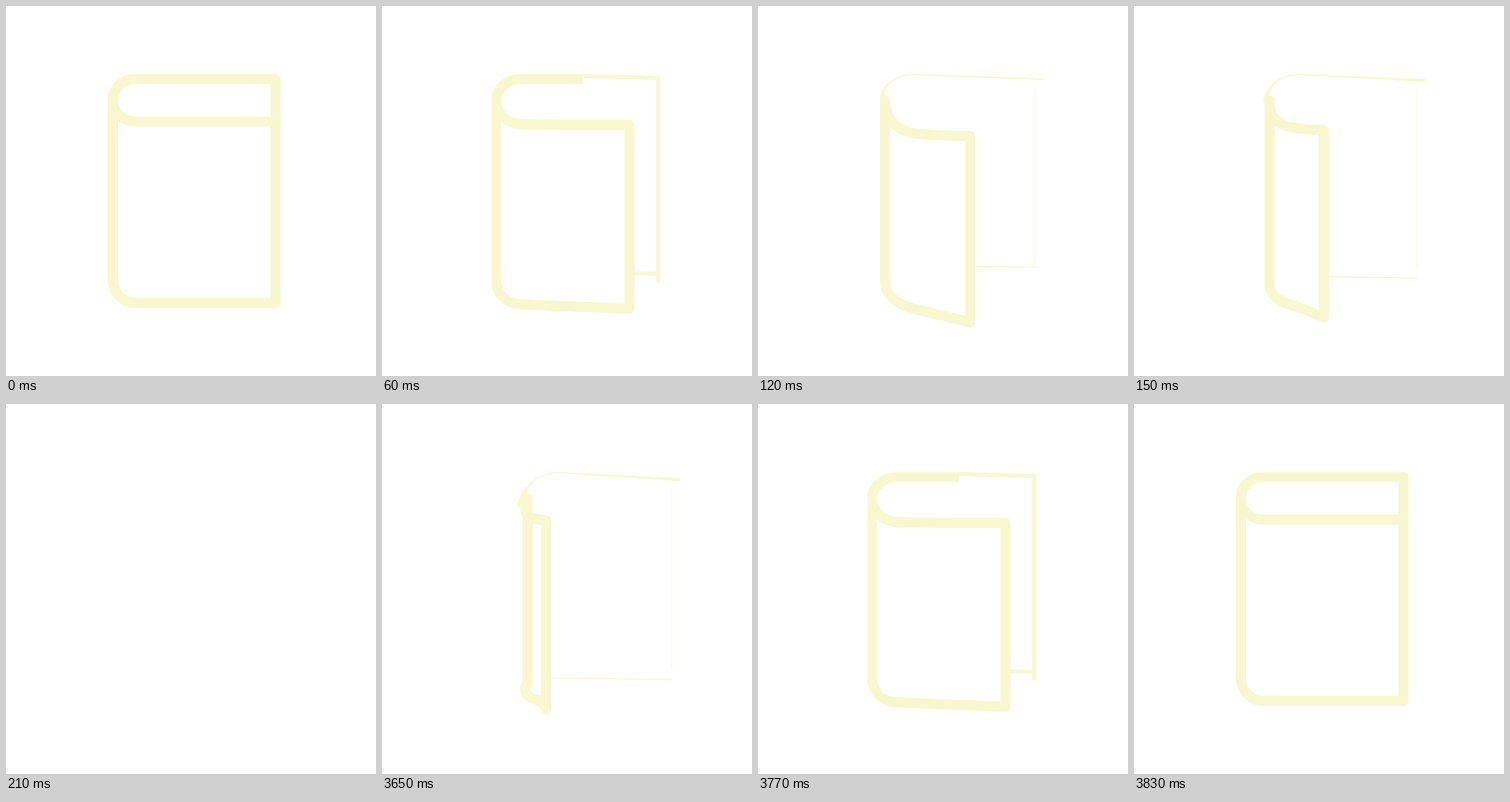
Recreate the animation shown at these times as an HTML page with a canvas. Size 400 by 400 pixels, loop 4860 ms.

```html
<!DOCTYPE html>
<html>
<head>
<meta charset="utf-8">
<style>
  html, body { margin: 0; width: 100%; height: 100%; overflow: hidden; background: #fff; }
  canvas { display: block; width: 400px; height: 400px; }
</style>
</head>
<body>
<canvas id="stage" width="400" height="400"></canvas>
<script>
const ctx = document.getElementById('stage').getContext('2d');
const PAPER = '#fff', INK = '#f9f7d0';
const LOOP = 4860, STEP = 30, CLOSING = 3650, LAST = 6;
const THICK = 11, TOP = 73.5, CAP = 102;

const lerp = (a, b, k) => a + (b - a) * k;
const mix = (a, b, k) => a.map((v, i) => lerp(v, b[i], k));

// Geometry of the book after k steps of opening
function bookAt(k) {
  const u = k / LAST;
  const lift = 15 * Math.sin(Math.PI * u ** 1.7) ** 2; // free edge swings toward the viewer
  const tucked = k > 3;                                // pages now hide the back cover
  const spine = 115.5 + 2.5 * k + .75 * k * k;
  const edge = 291.5 - 8.5 * k - 1.75 * k * k;
  return {
    u, lift, tucked, spine, edge,
    bulge: 10 * u ** 8,
    bend: spine + Math.min(24, (edge - spine) * .35),
    curl: spine + 23.5 + 1.5 * k,
    rimEnd: 291.5 - 37 * k,
    rim: tucked ? 1.6 : THICK,
    line: Math.max(1.3, THICK - 3.3 * k),
    backX: 291.5 + 2.7 * k + .4 * k * k,
    backY: TOP + 1.1 * k,
    backEnd: Math.max(321 - 12 * k, 268 + 3.3 * k),
    pageDrop: Math.max(-8, Math.min(8, 8 * (k - 4)))
  };
}

// Rounded corner from a to b around the point k
function corner(a, k, b) {
  ctx.bezierCurveTo(...mix(a, k, .55), ...mix(b, k, .55), ...b);
}

function line(width, x0, y0, x1, y1) {
  ctx.lineWidth = width;
  ctx.beginPath();
  ctx.moveTo(x0, y0);
  ctx.lineTo(x1, y1);
  ctx.stroke();
}

function drawBack({ u, tucked, edge, curl, rimEnd, line: w, backX, backY, backEnd, pageDrop }) {
  const inset = tucked ? 9 : 0;
  const x = backX - inset, y = backEnd + pageDrop;
  const start = Math.max(curl, rimEnd);
  line(tucked ? .7 : w, x, backY + w / 2 + inset, x, backEnd);
  line(w, edge, y, x, y + 2 * u);
  ctx.beginPath();
  ctx.moveTo(start, TOP);
  ctx.lineTo(backX, backY);
  ctx.lineTo(backX, backY + Math.max(w, 3.5 * u));
  ctx.lineTo(start, TOP + w);
  ctx.fill();
}

function drawSpine({ spine, bulge, curl, rim, rimEnd }) {
  const left = spine - THICK / 2, low = TOP + rim;
  const end = Math.max(curl, rimEnd);
  const outer = [left - .6 * bulge, CAP + .8 * bulge];
  const inner = [left + Math.max(rim, 5), CAP];
  ctx.beginPath();
  ctx.moveTo(...outer);
  corner(outer, [left, TOP], [curl, TOP]);
  ctx.lineTo(end, TOP);
  ctx.lineTo(end, low);
  ctx.lineTo(curl, low);
  corner([curl, low], [left + rim, low], inner);
  ctx.lineTo(spine, CAP + 18);
  ctx.fill();
  line(THICK, spine, CAP, spine, CAP + 18);
}

function drawFront({ u, lift, spine, edge, bulge, bend }) {
  const top = 125 + u + lift, bottom = 321 + 9 * u + lift;
  const x = spine - bulge;
  const upper = [spine, CAP + 4 * u], upperBend = [x, 125 - 4 * u + .45 * lift];
  const lower = [spine, 296 + 5 * u], lowerBend = [x, 321 - 7 * u * u];
  const upperEnd = [bend, lerp(upperBend[1], top, .6)];
  const lowerEnd = [bend, lerp(lowerBend[1], bottom, .3)];
  ctx.beginPath();
  ctx.moveTo(...upper);
  corner(upper, upperBend, upperEnd);
  ctx.quadraticCurveTo(...mix(upperBend, upperEnd, 1.6), edge, top);
  ctx.lineTo(edge, bottom);
  ctx.quadraticCurveTo(...mix(lowerBend, lowerEnd, 1.6), ...lowerEnd);
  corner(lowerEnd, lowerBend, lower);
  ctx.closePath();
  ctx.fillStyle = PAPER;
  ctx.fill();
  ctx.lineWidth = THICK;
  ctx.stroke();
}

function draw(now) {
  const t = now % LOOP;
  const step = t < CLOSING
    ? Math.floor(t / STEP)
    : Math.max(0, LAST - Math.floor((t - CLOSING) / STEP));
  ctx.fillStyle = PAPER;
  ctx.fillRect(0, 0, 400, 400);
  if (step <= LAST) {
    const book = bookAt(step);
    ctx.fillStyle = ctx.strokeStyle = INK;
    ctx.lineCap = ctx.lineJoin = 'round';
    drawBack(book);
    drawSpine(book);
    drawFront(book);
  }
  requestAnimationFrame(draw);
}
requestAnimationFrame(draw);
</script>
</body>
</html>
```
